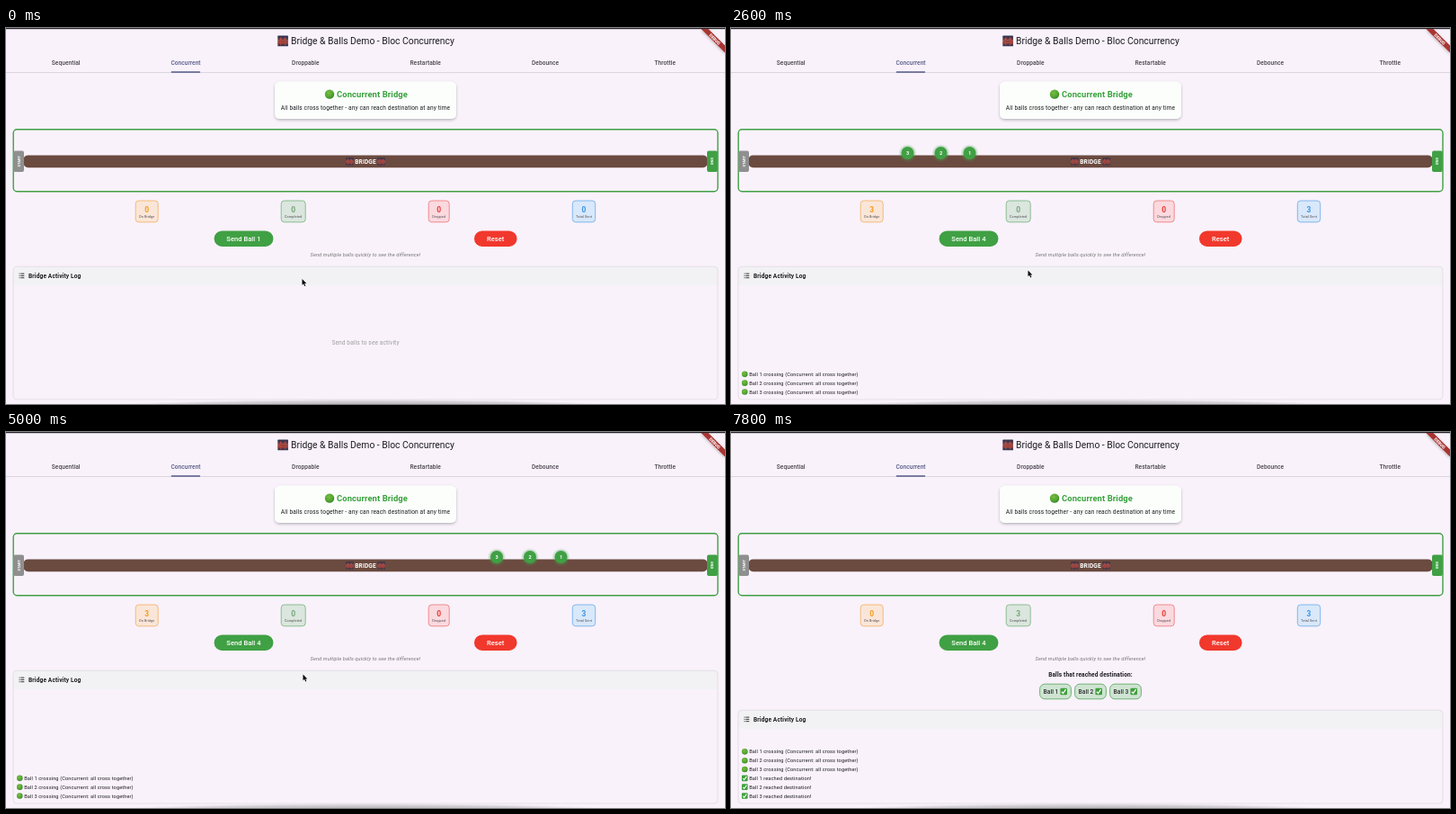
An HTML page for the animation above (7.9 s loop, 800 by 418 pixels).

```html
<!DOCTYPE html>
<html lang="en">
<head>
<meta charset="utf-8">
<title>Bridge &amp; Balls Demo</title>
<style>
  html, body { margin: 0; width: 100%; height: 100%; overflow: hidden; background: #f9f2fb; }
  svg { display: block; width: 100vw; height: 100vh; }
  text { font-family: Roboto, "Liberation Sans", sans-serif; white-space: pre; }
</style>
</head>
<body>
<svg id="stage" viewBox="0 0 800 418">
  <defs>
    <linearGradient id="dusk" x1="0" y1="0" x2="0" y2="1">
      <stop offset="0" stop-color="#27304f"/><stop offset=".55" stop-color="#8c4444"/><stop offset="1" stop-color="#29344f"/>
    </linearGradient>
    <radialGradient id="green" cx=".4" cy=".35" r=".65">
      <stop offset="0" stop-color="#79bd43"/><stop offset=".7" stop-color="#52a431"/><stop offset="1" stop-color="#3b8429"/>
    </radialGradient>
    <radialGradient id="glow">
      <stop offset=".6" stop-color="#43a047" stop-opacity=".5"/><stop offset="1" stop-color="#43a047" stop-opacity="0"/>
    </radialGradient>
    <radialGradient id="dock">
      <stop offset="0" stop-color="#777" stop-opacity=".55"/><stop offset=".7" stop-color="#888" stop-opacity=".32"/><stop offset="1" stop-color="#999" stop-opacity="0"/>
    </radialGradient>
    <filter id="soft" x="-10%" y="-30%" width="120%" height="170%">
      <feDropShadow dx="0" dy="1.4" stdDeviation="1.4" flood-color="#000" flood-opacity=".27"/>
    </filter>
    <g id="bridge">
      <rect width="12" height="12" rx=".6" fill="url(#dusk)"/>
      <path d="M0 5.5Q2 7.5 3.5 2.5Q6 9 8.5 2.5Q10 7.5 12 5.5" fill="none" stroke="#d9674b" stroke-width=".7"/>
      <path d="M3.5 2V11M8.5 2V11M0 8.3H12" stroke="#b9453b" stroke-width="1.1"/>
    </g>
    <g id="check">
      <rect x="-3.3" y="-3.3" width="6.6" height="6.6" rx="1" fill="#3f9f3c"/>
      <path d="M-2 .2L-.6 1.8L2 -2" fill="none" stroke="#fff" stroke-width="1.1"/>
    </g>
    <circle id="dot" r="3.3" fill="url(#green)"/>
  </defs>
  <g id="fixed"></g>
  <g id="live"></g>
</svg>
<script>
const LOOP = 7900, STEP = 100;
const UNIT = 0.47; // logical pixel size on the stage
const GREEN = '#40a044';

// Each ball: [time, x] points from entering the bridge to reaching the end.
const balls = [
  [[900, 19], [1800, 150], [2600, 265.5], [4000, 470], [5000, 617.5], [6000, 777]],
  [[1200, 26], [1800, 115.5], [2600, 233.5], [4000, 438], [5000, 583], [6200, 776]],
  [[1400, 19], [1800, 78.5], [2600, 196.5], [4000, 401], [5000, 546], [6300, 755.5], [6500, 779]]
];
const pointer = [[0, 329.5, 279], [100, 308.5, 259.5], [200, 308.5, 259.5], [700, 268, 237],
  [1400, 268, 237], [1800, 326, 267.5], [2000, 330.5, 269.5], [LOOP, 330.5, 269.5]];
const POINTER_GONE = 7200;

function along(points, t) {
  const i = points.findIndex(p => p[0] > t);
  if (i < 0) return points[points.length - 1].slice(1);
  const [a, b] = [points[i - 1], points[i]];
  const k = (t - a[0]) / (b[0] - a[0]);
  return a.slice(1).map((v, j) => v + (b[j + 1] - v) * k);
}

// cy is the middle of the capitals; size and spacing are logical pixels.
function text(str, x, cy, size, { fill = '#1d1b20', weight = 400, anchor = 'middle', gap = 0.25, more = '' } = {}) {
  const px = size * UNIT;
  return `<text x="${x}" y="${cy + px * 0.355}" font-size="${px}" font-weight="${weight}" fill="${fill}"
    text-anchor="${anchor}" letter-spacing="${gap * UNIT}" ${more}>${str}</text>`;
}
const rect = (x, y, w, h, r, fill, more = '') =>
  `<rect x="${x}" y="${y}" width="${w}" height="${h}" rx="${r}" fill="${fill}" ${more}/>`;
const use = (id, x, y, scale = 1) => `<use href="#${id}" transform="translate(${x} ${y}) scale(${scale})"/>`;

function drawFixed() {
  const tabs = ['Sequential', 'Concurrent', 'Droppable', 'Restartable', 'Debounce', 'Throttle'];
  return [
    rect(0, 0, 800, 418, 0, '#f9f2fb'),
    rect(0, 0, 800, 1.2, 0, '#25232a'),
    use('bridge', 302.3, 8.6, 0.97),
    text('Bridge &amp; Balls Demo - Bloc Concurrency', 317, 14.5, 22, { anchor: 'start', gap: 0 }),
    rect(0, 49.2, 800, 0.6, 0, '#c9c3cd'),
    ...tabs.map((name, i) => text(name, (i + 0.5) * 800 / 6, 38.6, 14,
      { weight: 500, gap: 0.1, fill: i === 1 ? '#555a87' : '#49454f' })),
    rect(183.6, 48.2, 32.6, 1.6, 0.8, '#555a87'),

    '<path d="M773.4 1H781.4L800 19.6V27.6Z" fill="#a83431" filter="url(#soft)"/>',
    text('DEBUG', 0, 0, 10.2, { fill: '#fff', weight: 900, gap: 0, more: 'transform="translate(788.6 12.4) rotate(45)"' }),

    rect(299, 59.5, 202, 41.5, 5.6, '#fcfefc', 'filter="url(#soft)"'),
    use('dot', 360, 73.6, 1.58),
    text('Concurrent Bridge', 368, 73.6, 20, { anchor: 'start', weight: 700, fill: '#36a13a' }),
    text('All balls cross together - any can reach destination at any time', 400, 89, 14),

    rect(8.2, 112.8, 783.8, 69, 4, 'none', `stroke="${GREEN}" stroke-width="1.4"`),
    rect(19.5, 141.4, 761, 13.8, 5, '#6b4a3f'),
    use('bridge', 378.2, 144.2, 0.7),
    text('BRIDGE', 400, 148.2, 14, { fill: '#fff', weight: 700 }),
    use('bridge', 413.4, 144.2, 0.7),
    rect(8.4, 136.4, 11.6, 23.6, 2, '#8f8f8f'),
    rect(780, 136.4, 11.8, 23.6, 2, GREEN),
    text('START', 0, 0, 8.8, { fill: '#fff', weight: 700, gap: 0, more: 'transform="translate(14.2 148.2) rotate(-90)"' }),
    text('END', 0, 0, 8.8, { fill: '#fff', weight: 700, gap: 0, more: 'transform="translate(785.9 148.2) rotate(90)"' }),

    rect(521, 225.5, 47.5, 17.4, 8.7, '#f1382d'),
    text('Reset', 544.7, 234.2, 16, { fill: '#fff', weight: 500, gap: 0.1 }),
    text('Send multiple balls quickly to see the difference!', 400, 251.8, 12, { fill: '#757575', more: 'font-style="italic"' })
  ].join('');
}

function stat(cx, width, value, label, ink, line, fill) {
  return rect(cx - width / 2, 192, width, 23.8, 3.5, fill, `stroke="${line}" stroke-width=".8"`) +
    text(value, cx, 201.6, 18, { fill: ink, weight: 700 }) +
    text(label, cx, 209.2, 8, { fill: '#4a464c' });
}

function ball(x, n) {
  return `<circle cx="${x}" cy="139.3" r="10.2" fill="url(#glow)"/><circle cx="${x}" cy="139" r="7" fill="${GREEN}"/>` +
    text(n, x, 139, 12, { fill: '#fff', weight: 700, gap: 0 });
}

function chip(cx, n) {
  return rect(cx - 17.4, 280.2, 34.8, 16.6, 5.5, '#cfe4d2', 'stroke="#62ab68" stroke-width=".9"') +
    text(`Ball ${n}`, cx - 13.4, 288.6, 14, { anchor: 'start', weight: 500, gap: 0.1, fill: '#2c2a30' }) +
    use('check', cx + 9.2, 288.5, 1.15);
}

function logPanel(y, rows) {
  const bars = [0, 2.3, 4.6].map(d =>
    `<path d="M14.6 ${y + 7.9 + d}h1M16.4 ${y + 7.9 + d}h3.9" stroke="#333" stroke-width="1"/>`).join('');
  const lines = rows.map(([icon, str], i) => {
    const cy = 404.5 - (rows.length - 1 - i) * 9.83;
    return use(icon, 15.3, cy) + text(str, 20.2, cy, 12, { anchor: 'start' });
  }).join('');
  return `<path d="M8 ${y + 20.8}V${y + 4}q0-4 4-4H788q4 0 4 4V${y + 20.8}Z" fill="#f2f2f4"/>` +
    rect(8, y, 784, 413 - y, 4, 'none', 'stroke="#dbd6df" stroke-width=".7"') + bars +
    text('Bridge Activity Log', 25, y + 10.4, 14, { anchor: 'start', weight: 700 }) +
    (rows.length ? lines : text('Send balls to see activity', 400, 349.6, 14, { fill: '#9e9e9e' }));
}

function drawLive(t) {
  const runs = balls.map((path, i) => ({ n: i + 1, path, start: path[0][0], end: path[path.length - 1][0] }));
  const sent = runs.filter(b => t >= b.start);
  const done = runs.filter(b => t >= b.end);
  const moving = sent.filter(b => t < b.end);
  const rows = [
    ...sent.map(b => ['dot', `Ball ${b.n} crossing (Concurrent: all cross together)`]),
    ...done.map(b => ['check', `Ball ${b.n} reached destination!`])
  ];
  const [px, py] = along(pointer, t);
  return [
    ...moving.map(b => ball(along(b.path, t)[0], b.n)),
    stat(156.7, 25, moving.length, 'On Bridge', '#f79a1c', '#f3ae5c', '#fae6d8'),
    stat(319.7, 27, done.length, 'Completed', '#76a57a', '#74b27a', '#dbe6de'),
    stat(481.7, 23, 0, 'Dropped', '#e73a34', '#ee7473', '#fad9df'),
    stat(643, 25.4, sent.length, 'Total Sent', '#3d94e2', '#68a9e8', '#d9e8fa'),
    rect(231.6, 225.5, 65.8, 17.4, 8.7, GREEN),
    text(`Send Ball ${sent.length + 1}`, 264.4, 234.2, 16, { fill: '#fff', weight: 500, gap: 0.1 }),
    done.length ? text('Balls that reached destination:', 400, 269.5, 14, { weight: 700 }) : '',
    ...done.map((b, i) => chip(400 + (i - (done.length - 1) / 2) * 39, b.n)),
    logPanel(done.length ? 309.2 : 265.2, rows),
    '<ellipse cx="400" cy="419" rx="270" ry="6" fill="url(#dock)"/>',
    t < POINTER_GONE ? `<path transform="translate(${px} ${py})" d="M0 0V6.7L1.6 5.3L2.7 7.9L3.8 7.4L2.7 4.9H4.8Z"
      fill="#000" stroke="#fff" stroke-width=".6" paint-order="stroke"/>` : ''
  ].join('');
}

const live = document.getElementById('live');
document.getElementById('fixed').innerHTML = drawFixed();
const origin = performance.now();
let shown = -1;

function tick() {
  const t = Math.floor((performance.now() - origin) % LOOP / STEP) * STEP;
  if (t !== shown) live.innerHTML = drawLive(shown = t);
  requestAnimationFrame(tick);
}
tick();
</script>
</body>
</html>
```
